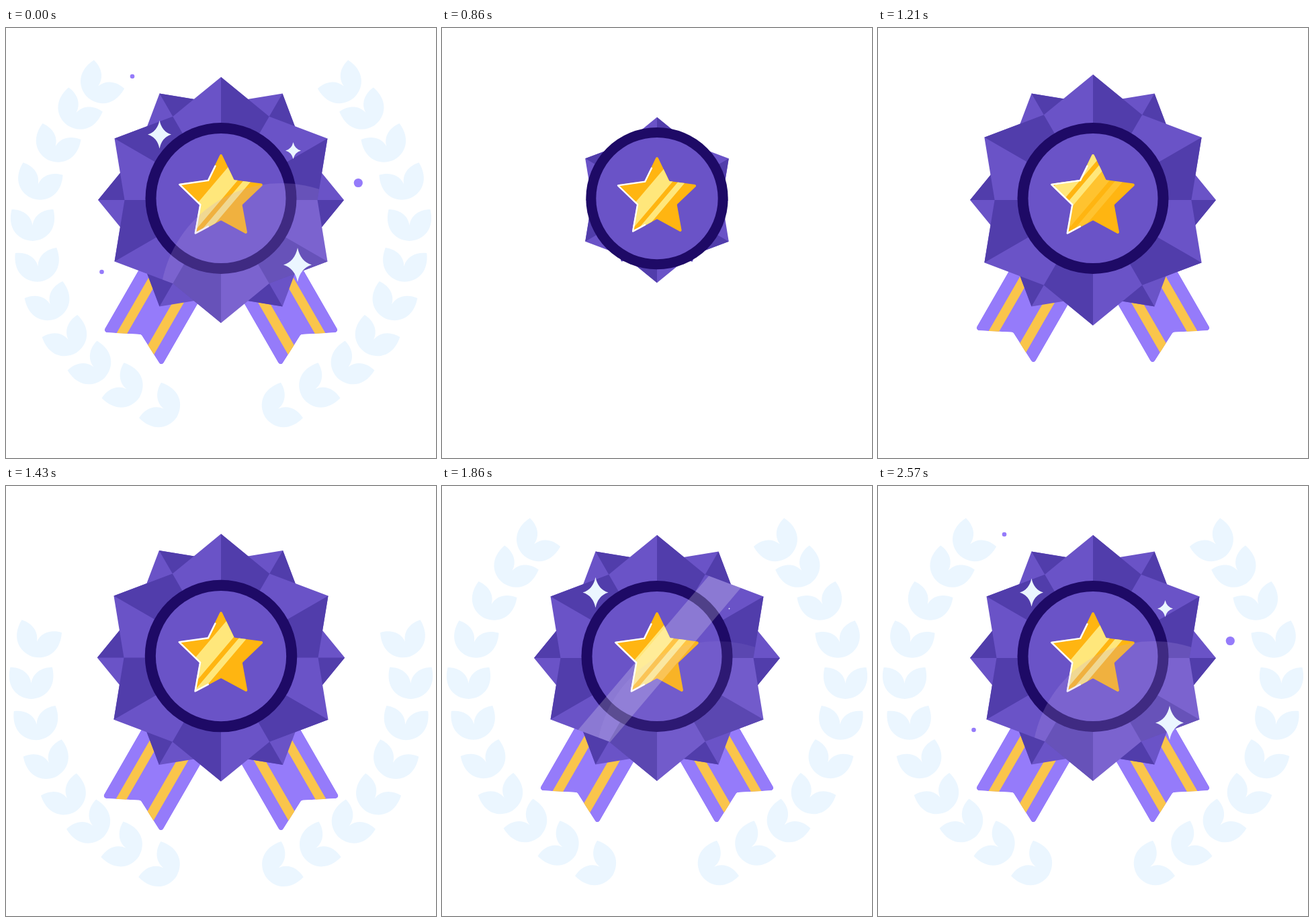
An HTML page with a canvas that plays this animation: 640 by 640 pixels, repeating every 2.87 s.

```html
<!DOCTYPE html>
<html lang="en">
<head>
<meta charset="utf-8">
<title>Award medal</title>
<style>
  html, body { margin: 0; width: 100%; height: 100%; overflow: hidden; background: #fff; }
  canvas { display: block; width: 100vw; height: 100vh; }
</style>
</head>
<body>
<canvas id="stage" width="640" height="640"></canvas>
<script>
const ctx = document.getElementById('stage').getContext('2d');
const LOOP = 2870, HOLD = 430, STEP = 500 / 7, LAST_STEP = 30;
const LIGHT = '#6a53c7', DARK = '#513dab', NAVY = '#1e0a66', VIOLET = '#957bfa';
const YELLOW = '#fac54b', ORANGE = '#ffb511', PALE_GOLD = '#ffe77b', ICE = '#ebf6ff';
const MEDAL = { x: 320, y: 256 };
const SLANT = 0.848;

// Left half of the wreath, bottom to top: x, y, tilt in degrees.
const LEAVES = [
  [214.5, 554, -58], [159, 524.5, -58], [113.5, 487.5, -45], [80, 443.5, -32],
  [56, 389.5, -24], [44.5, 331, -7.5], [39.5, 270, 0], [55, 209.5, 17.5],
  [83, 154, 23], [118.5, 106.5, 35.5], [153.5, 69, 43]
];
// x, y, half width, half height, first step
const SPARKLES = [[228.5, 158.5, 17.5, 21, 15.5], [427.5, 182.5, 11.5, 12.5, 19.2], [434, 352.5, 21, 25.5, 22]];
// x, y, radius, first step
const DOTS = [[188, 72, 3.3, 22], [524.3, 230.5, 6.6, 23], [142.5, 363, 3.3, 24]];

const clamp = v => Math.min(1, Math.max(0, v));
const mix = (a, b, p) => a + (b - a) * p;
const ramp = (k, from, to) => clamp((k - from) / (to - from));
const smooth = (k, from, to) => { const p = ramp(k, from, to); return p * p * (3 - 2 * p); };
const pop = (k, start) => 1.1 * smooth(k, start, start + 4) - 0.1 * smooth(k, start + 4, start + 6);
const polar = (r, degrees) => [r * Math.cos(degrees * Math.PI / 180), r * Math.sin(degrees * Math.PI / 180)];

function group(draw) {
  ctx.save();
  draw();
  ctx.restore();
}

function scaleAbout(x, y, s) {
  ctx.translate(x, y);
  ctx.scale(s, s);
  ctx.translate(-x, -y);
}

function mirrored(draw) {
  draw();
  group(() => {
    ctx.translate(640, 0);
    ctx.scale(-1, 1);
    draw();
  });
}

function polygon(points, radius = 0) {
  const path = new Path2D();
  const n = points.length, [first, last] = [points[0], points[n - 1]];
  path.moveTo((first[0] + last[0]) / 2, (first[1] + last[1]) / 2);
  points.forEach((p, i) => path.arcTo(...p, ...points[(i + 1) % n], radius));
  path.closePath();
  return path;
}

function starPoints(count, outer, inner, cx = 0, cy = 0) {
  return Array.from({ length: count * 2 }, (_, i) => {
    const [x, y] = polar(i % 2 ? inner : outer, -90 + 180 * i / count);
    return [cx + x, cy + y];
  });
}

function fill(path, color) {
  ctx.fillStyle = color;
  ctx.fill(path);
}

function circle(x, y, r, color) {
  ctx.fillStyle = color;
  ctx.beginPath();
  ctx.arc(x, y, r, 0, 7);
  ctx.fill();
}

// Slanted bar between two x positions measured on the line y.
function bar(x1, x2, y, slant, color) {
  const h = 300;
  fill(polygon([[x1 + slant * h, y - h], [x2 + slant * h, y - h], [x2 - slant * h, y + h], [x1 - slant * h, y + h]]), color);
}

const leafPair = new Path2D(
  'M-31 0C-16 0-2 8 0 24V47C-22 46-38 28-31 0Z M31 0C16 0 2 8 0 24V47C22 46 38 28 31 0Z');
const gemPoints = starPoints(6, 183, 143.5);
const gemPath = polygon(gemPoints);
const gemShadows = new Path2D();
gemPoints.forEach((p, i) => {
  if (i % 2 === 0) gemShadows.addPath(polygon([[0, 0], p, gemPoints[i + 1]]));
});
const ribbonPath = polygon([[232, 300], [144, 453], [201, 456], [231.5, 504], [349, 300]], 4);
const starPath = polygon(starPoints(5, 67.5, 33.2, 320, 253), 2);
const rim = starPoints(5, 65, 32.3, 320, 253);

function drawWreath(k) {
  const shown = 8 + 2.93 * (k - 14);
  LEAVES.forEach(([x, y, tilt], i) => {
    const grow = clamp(shown - i);
    if (!grow) return;
    group(() => {
      ctx.translate(x, y);
      ctx.rotate(tilt * Math.PI / 180);
      scaleAbout(0, 47, grow);
      fill(leafPair, ICE);
    });
  });
}

function drawRibbon() {
  group(() => {
    ctx.clip(ribbonPath);
    fill(ribbonPath, VIOLET);
    bar(167, 183, 450, 0.577, YELLOW);
    bar(224, 241, 450, 0.577, YELLOW);
  });
}

function drawGem(scale, turn) {
  if (scale <= 0) return;
  group(() => {
    ctx.translate(MEDAL.x, MEDAL.y);
    ctx.rotate(turn * Math.PI / 180);
    ctx.scale(scale, scale);
    fill(gemPath, LIGHT);
    fill(gemShadows, DARK);
  });
}

function drawGlints(shift, alpha) {
  ctx.globalAlpha = alpha;
  bar(289 + shift, 320 + shift, 256, SLANT, PALE_GOLD);
  bar(329 + shift, 341 + shift, 256, SLANT, PALE_GOLD);
  ctx.globalAlpha = 1;
}

function drawStar(k) {
  fill(starPath, ORANGE);
  group(() => {
    ctx.clip(starPath);
    drawGlints(0, 1 - ramp(k, 8.5, 12));
    if (k >= 9) drawGlints(-86 * (1 - ramp(k, 9, 16)) ** 2, 1);
  });
  const between = (a, b, p) => [mix(a[0], b[0], p), mix(a[1], b[1], p)];
  const line = [between(rim[9], rim[0], 0.55), rim[9], rim[8], rim[7], rim[6], between(rim[6], rim[5], 0.5)];
  ctx.beginPath();
  line.forEach(p => ctx.lineTo(...p));
  ctx.strokeStyle = '#fff';
  ctx.lineWidth = 2.5;
  ctx.lineJoin = ctx.lineCap = 'round';
  ctx.stroke();
}

function drawDisc(k) {
  group(() => {
    scaleAbout(MEDAL.x, MEDAL.y, smooth(k, -0.55, 7.15));
    circle(320, 253.5, 112.5, NAVY);
    circle(320, 253.5, 96.5, LIGHT);
    drawStar(k);
  });
}

function drawReflections(k) {
  group(() => {
    ctx.translate(MEDAL.x, MEDAL.y);
    ctx.clip(gemPath);
    ctx.translate(-MEDAL.x, -MEDAL.y);
    circle(410, 412, 181, `rgba(182,162,235,${0.21 * ramp(k, 16, 24.5)})`);
    const x = mix(44, 604, smooth(k, 16, 24));
    bar(x - 31.5, x + 31.5, 257, SLANT, 'rgba(255,255,255,.22)');
  });
}

function drawSparkle([x, y, w, h, start], k) {
  const s = pop(k, start);
  if (s <= 0) return;
  group(() => {
    ctx.translate(x, y);
    ctx.scale(w * s, h * s);
    fill(new Path2D('M0-1Q.2-.2 1 0Q.2.2 0 1Q-.2.2-1 0Q-.2-.2 0-1Z'), ICE);
  });
}

function draw(k) {
  ctx.fillStyle = '#fff';
  ctx.fillRect(0, 0, 640, 640);
  group(() => {
    const pulse = Math.cos(Math.PI / 2 * Math.min(1, Math.abs(k - 15.5) / 2.43)) ** 2;
    scaleAbout(320, 320, 1 + 0.021 * pulse);
    mirrored(() => drawWreath(k));
    if (k >= 8) group(() => {
      ctx.translate(0, -150 + 164 * smooth(k, 6.2, 12.2) - 14 * smooth(k, 12.2, 18));
      mirrored(drawRibbon);
    });
    drawGem(smooth(k, 2.3, 9), 30);
    drawGem(1.04 * smooth(k, 1.5, 9) - 0.04 * smooth(k, 9, 13), 0);
    drawDisc(k);
    drawReflections(k);
    SPARKLES.forEach(s => drawSparkle(s, k));
    DOTS.forEach(([x, y, r, start]) => circle(x, y, r * pop(k, start), VIOLET));
  });
}

function frame() {
  const t = performance.now() % LOOP;
  // The motion runs at 14 steps per second after an opening hold on the finished medal.
  draw(t < HOLD ? LAST_STEP : Math.min(LAST_STEP, Math.floor((t - HOLD + 5) / STEP)));
  requestAnimationFrame(frame);
}
frame();
</script>
</body>
</html>
```
